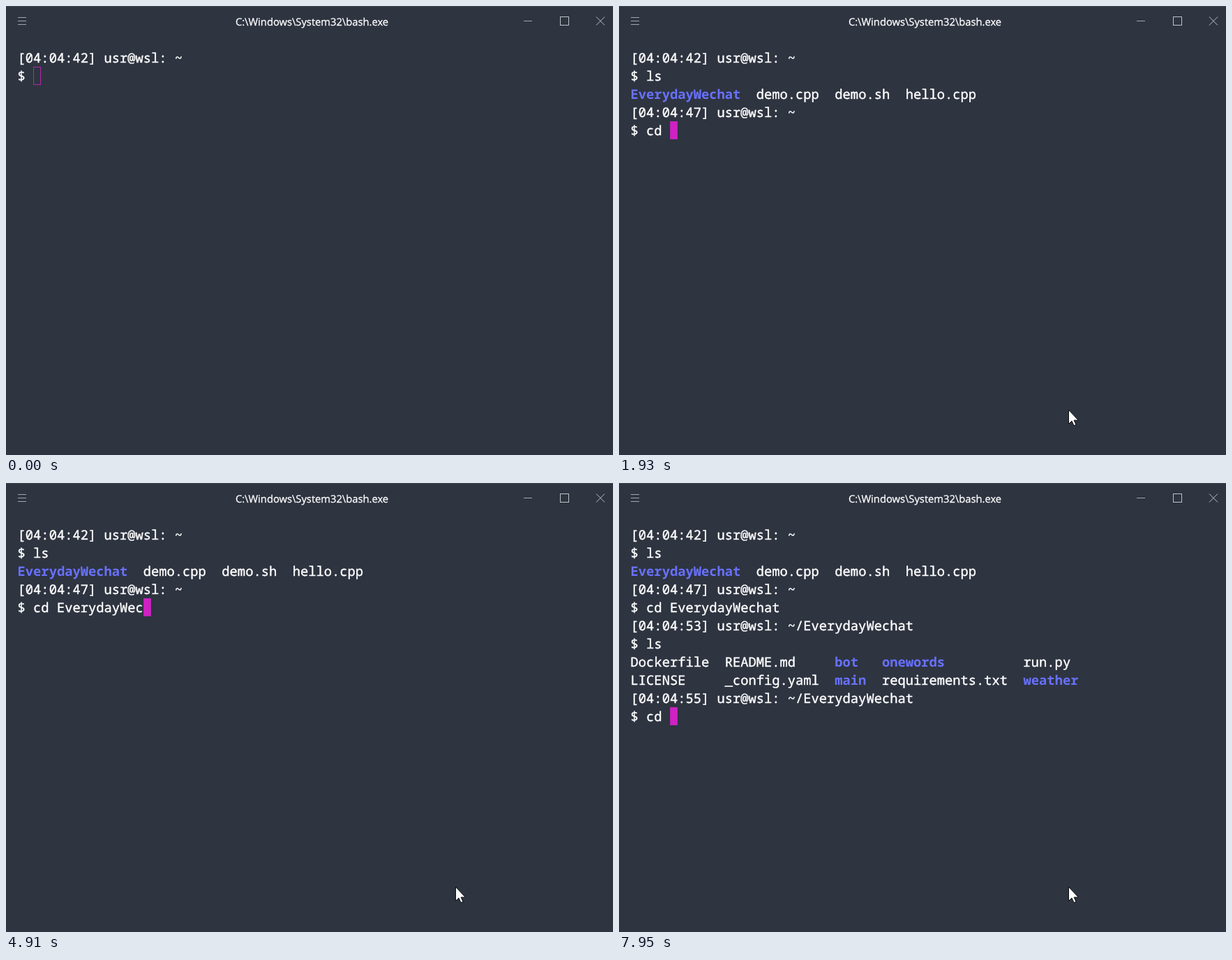
Write an HTML page that moves like this. It is 870 by 643 pixels and loops after 8000 ms.

```html
<!DOCTYPE html>
<html lang="en">
<head>
<meta charset="utf-8">
<title>Terminal</title>
<style>
  html, body { margin: 0; width: 100%; height: 100%; overflow: hidden; background: #2e3440; }
  svg { position: absolute; left: 0; top: 0; }
  pre {
    position: absolute; left: 16.6px; top: 61px; margin: 0; color: #fff;
    font: 18.78px/26px "Noto Sans Mono", monospace; -webkit-text-stroke: .4px;
    text-rendering: geometricPrecision; font-variant-ligatures: none;
  }
  pre b { color: #6871ff; -webkit-text-stroke: 0; }
  pre i {
    display: inline-block; box-sizing: border-box; vertical-align: top;
    width: 1ch; height: 26px; border: 1px solid #b028aa;
  }
  pre i.focused { background: #d021c4; }
  .title {
    font: 14.72px "Open Sans", sans-serif; text-rendering: geometricPrecision;
    fill: #fff; stroke: #fff; stroke-width: .3;
  }
  .icons { fill: none; stroke: #a2a6ad; }
</style>
</head>
<body>
<pre id="screen"></pre>
<svg width="870" height="643" viewBox="0 0 870 643">
  <path d="M0 .5H870" stroke="#3f4551"/>
  <text class="title" x="438.5" y="28" text-anchor="middle">C:\Windows\System32\bash.exe</text>
  <g class="icons">
    <path d="M17 16.5h12M17 21.5h12M17 26.5h12M742 21.5h12"/>
    <rect x="794.5" y="15.5" width="12" height="12" stroke="#bfc2c7"/>
    <path d="M846 15.5l12 12m0-12l-12 12" stroke="#bfc2c7"/>
  </g>
  <g id="pointer">
    <circle id="click" r="15" fill="#ff0" fill-opacity=".47"/>
    <path d="M.5 0V20L5 15.8 8 22.4 11 21.1 8.1 14.7H14.3Z" fill="#fff" stroke="#000" stroke-width=".9"/>
  </g>
</svg>
<script>
const LOOP = 8000;
const terminal = document.getElementById('screen');
const pointer = document.getElementById('pointer');
const click = document.getElementById('click');

const prompt_ = (clock, dir) => `[04:04:${clock}] usr@wsl: ${dir}\n$ `;
const type = (text, ...times) => times.map((time, i) => [time, text[i]]);
const print = (time, text) => [[time, '\n' + text]];
const project = '~/EverydayWechat';

// Each entry is [time, text appended to the terminal].
const session = [
  [0, prompt_(42, '~')],
  ...type('ls', 1000, 1120),
  ...print(1230, '<b>EverydayWechat</b>  demo.cpp  demo.sh  hello.cpp\n' + prompt_(47, '~')),
  ...type('cd EverydayWechat', 1760, 1840, 1930, 2530, 2830, 2910, 2990, 3160,
    3680, 3740, 4210, 4490, 4670, 4910, 4960, 5650, 5770),
  ...print(6210, prompt_(53, project)),
  ...type('ls', 6870, 6930),
  ...print(7030,
    'Dockerfile  README.md     <b>bot</b>   <b>onewords</b>          run.py\n' +
    'LICENSE     _config.yaml  <b>main</b>  requirements.txt  <b>weather</b>\n' +
    prompt_(55, project)),
  ...type('cd ', 7680, 7730, 7950),
];

const pointerPath = [[190, 719, 628], [260, 668, 594], [320, 644, 578.5]];
let shown = '';

function draw(t) {
  const log = session.filter(([time]) => time <= t).map(([, text]) => text).join('');
  const html = log + `<i class="${t >= 480 ? 'focused' : ''}"></i>`;
  if (html !== shown) terminal.innerHTML = shown = html;

  const spot = pointerPath.filter(([time]) => time <= t).pop();
  pointer.style.display = spot ? '' : 'none';
  if (spot) pointer.setAttribute('transform', `translate(${spot[1]} ${spot[2]})`);
  click.style.display = t >= 480 && t < 590 ? '' : 'none';
}

const start = performance.now();
function tick() {
  draw((performance.now() - start) % LOOP);
  requestAnimationFrame(tick);
}
tick();
</script>
</body>
</html>
```
